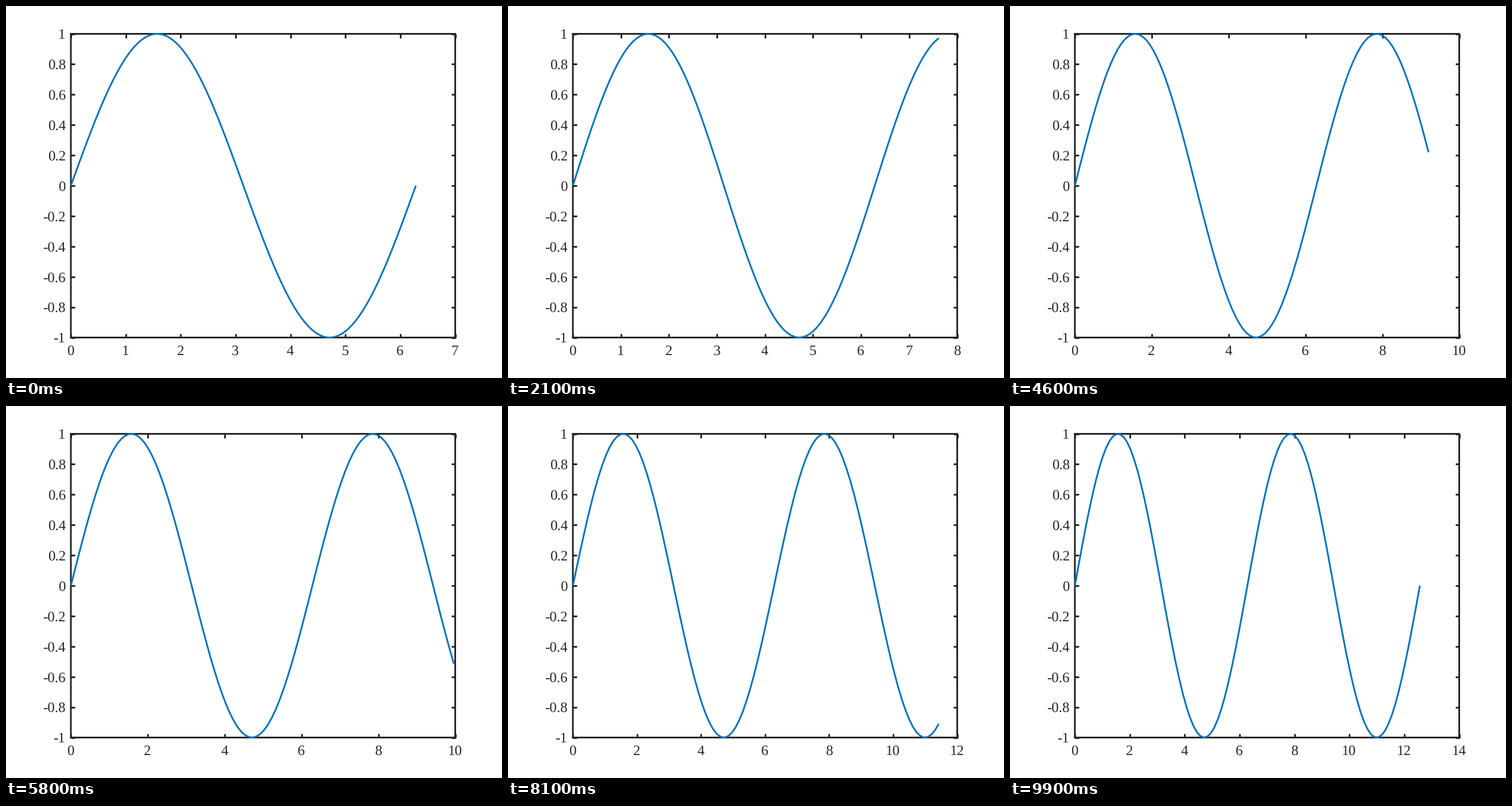
A matplotlib script that plays this animation: 864 by 648 pixels, repeating every 10000 ms.

```python
import matplotlib.pyplot as plt
import numpy as np
from matplotlib.animation import FuncAnimation

W, H = 864, 648
LEFT, RIGHT, TOP, BOTTOM = 113, 782.5, 48.5, 577.5
FRAMES = 100
INK = "#262626"
BLUE = "#0072BD"

plt.rcParams.update({
    "font.family": "Liberation Serif",
    "font.size": 25,
    "text.hinting": "none",
})

# At 72 dpi one point is one pixel.
fig = plt.figure(figsize=(W / 72, H / 72), dpi=72, facecolor="white")
ax = fig.add_axes([LEFT / W, 1 - BOTTOM / H,
                   (RIGHT - LEFT) / W, (BOTTOM - TOP) / H])
ax.set_ylim(-1, 1)
ax.set_axisbelow(True)
ax.tick_params(direction="in", length=7, width=3, color=INK, top=True,
               right=True, labelleft=False, labelbottom=False)
for spine in ax.spines.values():
    spine.set(linewidth=3, edgecolor=INK, snap=False)


def label(x, y, text="", ha="center"):
    """Place text with its baseline at pixel (x, y), measured from the top."""
    return fig.text(x / W, 1 - y / H, text, ha=ha, va="baseline", color=INK)


y_ticks = np.round(np.linspace(-1, 1, 11), 1) + 0.0
ax.set_yticks(y_ticks)
for v in y_ticks:
    py = BOTTOM - (v + 1) / 2 * (BOTTOM - TOP)
    right = 103 if abs(v) == 1 else 104
    label(right, py + 8.5, f"{v:g}", ha="right")

x_labels = [label(LEFT, 607.5) for _ in range(10)]
curve, = ax.plot([], [], color=BLUE, lw=3, clip_on=False, zorder=3,
                 solid_capstyle="butt", solid_joinstyle="round")

ends = np.linspace(2 * np.pi, 4 * np.pi, FRAMES)


def nice_axis(end):
    """Smallest round limit that holds the curve, and its tick step."""
    step = 1 if end <= 9 else 2
    return int(np.ceil(end / step)) * step, step


def update(i):
    x = np.linspace(0, ends[i], 100)
    curve.set_data(x, np.sin(x))

    limit, step = nice_axis(ends[i])
    ticks = list(range(0, limit + 1, step))
    ax.set_xlim(0, limit)
    ax.set_xticks(ticks)
    for k, text in enumerate(x_labels):
        shown = k < len(ticks)
        text.set_visible(shown)
        if shown:
            px = LEFT - 0.5 + ticks[k] / limit * (RIGHT - LEFT)
            text.set_x(px / W)
            text.set_text(str(ticks[k]))
    return [curve, *x_labels]


anim = FuncAnimation(fig, update, frames=FRAMES, interval=100,
                     repeat=True, repeat_delay=0, blit=False)
plt.show()
```
